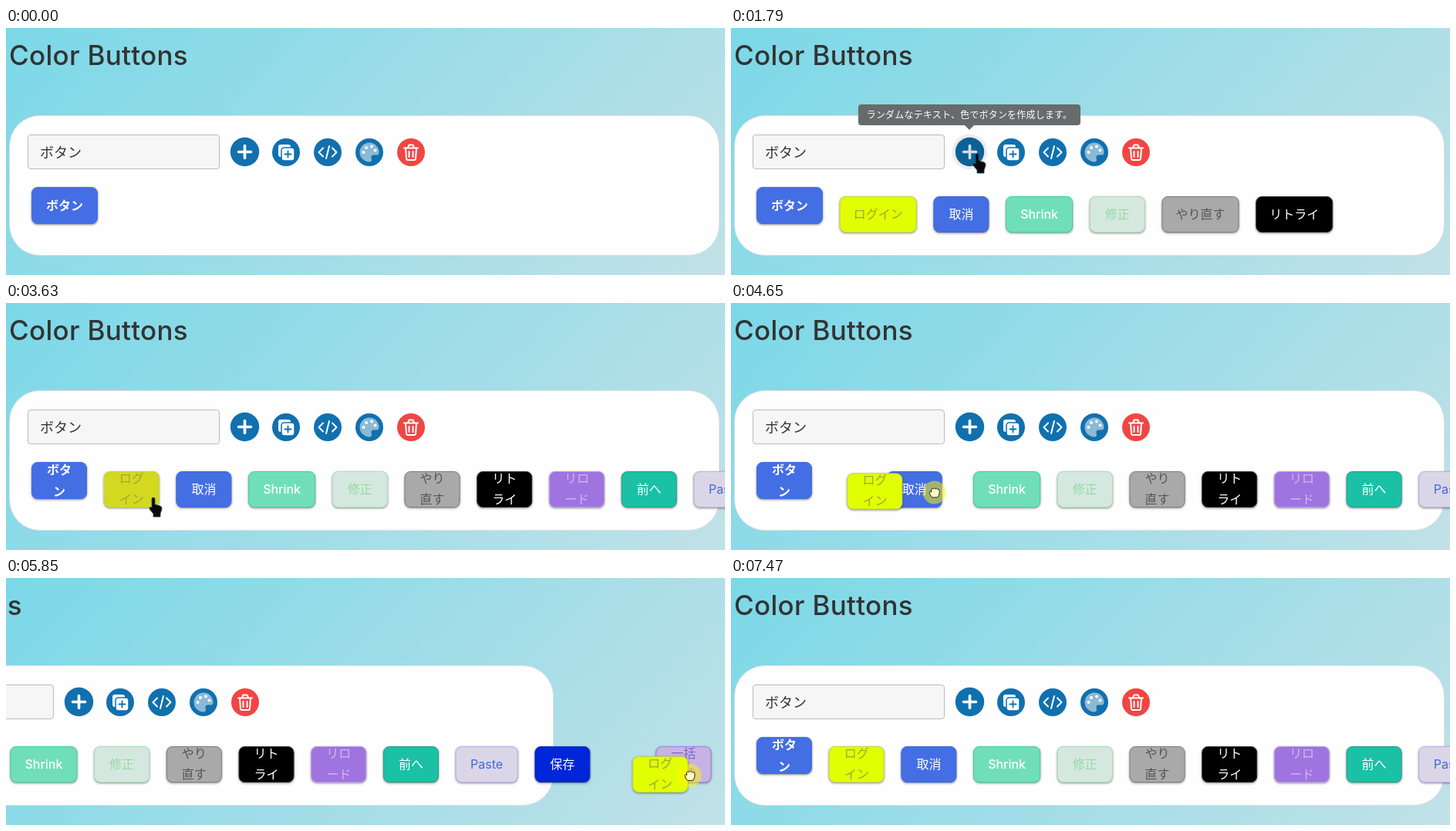
Write an HTML page that moves like this. It is 932x320 px and loops after 8.48 s.

```html
<!DOCTYPE html>
<html lang="ja">
<head>
<meta charset="utf-8">
<title>Color Buttons</title>
<style>
html, body { margin: 0; width: 100%; height: 100%; overflow: hidden; }
body {
  position: relative;
  background: linear-gradient(135deg, #7bd8e8, #c1e1e7);
  font-family: Inter, "Noto Sans CJK JP", "Noto Sans CJK", sans-serif;
}
#page, #page > *, .btn, #cursor { position: absolute; }
#page { left: 0; top: 0; width: 932px; height: 320px; }
h1 { left: 4px; top: 14px; margin: 0; font-size: 35px; line-height: 42px; font-weight: 500; letter-spacing: .3px; color: #333; white-space: nowrap; }
#card { left: 4px; top: 113px; width: 919px; height: 180px; border: 1px solid #d9dfe0; border-radius: 40px; background: #fefefe; }
#field { left: 28px; top: 138px; width: 232px; height: 43px; padding-left: 15px; border: 1px solid #bbb; border-radius: 4px; background: #f6f6f6; font-size: 18px; line-height: 45px; font-weight: 300; color: #333; }
#icons { left: 280px; top: 130px; }
#tip { left: 165px; top: 99px; width: 288px; height: 27px; border-radius: 4px; background: #676b6c; color: #fff; font-size: 12px; letter-spacing: .2px; line-height: 27px; text-align: center; white-space: nowrap; }
#tip::after { content: ""; position: absolute; left: 138px; top: 27px; border: 6px solid transparent; border-top-color: #676b6c; border-bottom: 0; }
#row { left: 0; top: 0; }
.btn {
  display: flex; flex-direction: column; justify-content: center; align-items: center;
  box-sizing: border-box; left: 0; top: 0; height: 47px; padding-bottom: 1px;
  border: 1px solid; border-radius: 8px; box-shadow: 0 1px 3px rgba(0, 0, 0, .45);
  font-size: 16px; line-height: 27px; white-space: nowrap;
}
.btn div { text-align: center; }
.two span { display: block; }
#cursor { left: 0; top: 0; overflow: visible; }
</style>
</head>
<body>
<div id="page">
  <h1>Color Buttons</h1>
  <div id="card"></div>
  <div id="field">ボタン</div>
  <svg id="icons" width="280" height="62" fill="none" stroke="#fff" stroke-width="2" stroke-linecap="round" stroke-linejoin="round">
    <circle id="halo" cx="29.500" cy="30.500" r="23" fill="#ededed" stroke="none"/>
    <g fill="#1170ae" stroke="none">
      <circle id="add" cx="29.500" cy="30.500" r="18.700"/>
      <circle cx="83" cy="31" r="18"/>
      <circle cx="137" cy="31" r="18"/>
      <circle cx="191" cy="31" r="18"/>
      <circle cx="245" cy="31" r="18" fill="#f04644"/>
    </g>
    <path id="plus" d="M21.500 30.500h16M29.500 22.500v16" stroke-width="3.600"/>
    <g transform="translate(83 31)">
      <rect x="-10" y="-10" width="16" height="16" rx="3" fill="#fff" stroke="none"/>
      <rect x="-6" y="-6" width="17" height="17" rx="3.500" fill="#fff" stroke="#1170ae" stroke-width="1.500"/>
      <path d="M-1.500 2.500h8M2.500-1.500v8" stroke="#1170ae" stroke-width="1.800"/>
    </g>
    <path transform="translate(137 31)" d="M-6-5.500L-11.500 0L-6 5.500M6-5.500L11.500 0L6 5.500M2-8L-2 8"/>
    <g transform="translate(191 31)" stroke="none">
      <path d="M0-12.500A12.500 12.500 0 1 0 0 12.500C4 12.500 3 9 2.500 7.500C2 4 4 3 7 3.500C11 4 12.500 3 12.500 0A12.500 12.500 0 0 0 0-12.500Z" fill="#8bbad6"/>
      <g fill="#fff"><circle cx="-7.500" r="2"/><circle cx="-4" cy="-6" r="2"/><circle cx="3" cy="-7.500" r="2"/><circle cx="7.500" cy="-2.500" r="2"/></g>
    </g>
    <path transform="translate(245 31)" d="M-9-5.500H9M-4-6L-2.500-9.500H2.500L4-6M-7-5L-6 8Q-6 10-4 10H4Q6 10 6 8L7-5M-2.500-1V6M2.500-1V6"/>
  </svg>
  <div id="row"></div>
  <div id="tip">ランダムなテキスト、色でボタンを作成します。</div>
</div>
<svg id="cursor" width="1" height="1" stroke-linejoin="round" stroke-linecap="round">
  <circle id="glow" r="15" fill="#fff700" fill-opacity=".5"/>
  <path id="point" d="M-2 1Q-2-1 0-1Q2-1 2 1V8L9 10Q11.500 11 11 14L9 20V24H0V20L-5 14Q-5 10-2 12Z" fill="#0a0a0a" stroke="#223c58" stroke-width=".8"/>
  <path id="grab" d="M-4-1V-4Q-3-6-1.500-4.500Q0-7 1.500-4.500Q3-6 4-4Q6-5 6.500-2.500V1Q6 4 4 6.500H-3Q-6 3-6.500 0Q-6-2-4-1Z" fill="#fffbc0" stroke="#222"/>
</svg>
<script>
const LOOP = 8480, GAP = 21.7, MIN = 72, LEFT = 33, RIGHT = 899;
const $ = id => document.getElementById(id);
const clamp = v => Math.max(0, Math.min(1, v));

// label, natural width, fill, text, border, weight, time of creation
const items = [
  ['ボタ|ン', 86, '#446ee3', '#fff', '#446ee3', 700, 0],
  ['ログ|イン', 100, '#e1ff00', '#a1a53f', '#c6d83a', 300, 790],
  ['取消', 72, '#446ee3', '#fff', '#3d66d8', 400, 990],
  ['Shrink', 87, '#70dfb9', '#fff', '#3fd09b', 500, 1190],
  ['修正', 72, '#d5e8df', '#98d9a8', '#aedfba', 400, 1390],
  ['やり|直す', 100, '#a9a9a9', '#555', '#7d7d7d', 300, 1590],
  ['リト|ライ', 100, '#000', '#fff', '#333', 400, 1790],
  ['リロ|ード', 100, '#9f74e0', '#d0b8ef', '#b69be4', 300, 1990],
  ['前へ', 72, '#1ac1a5', '#fff', '#2c9b85', 400, 2190],
  ['Paste', 81, '#dad6e8', '#4668d8', '#b9b0e6', 400, 2300],
  ['保存', 72, '#0026da', '#fff', '#1238b0', 500, 2500],
  ['一括|削除', 100, '#c7b3e3', '#7d66c6', '#9d86dc', 300, 2690]
].map(([label, width, fill, color, border, weight, born]) => {
  const el = document.createElement('div');
  el.className = 'btn';
  el.innerHTML = '<div>' + label.split('|').map(s => `<span>${s}</span>`).join('') + '</div>';
  Object.assign(el.style, { background: fill, color, borderColor: border, fontWeight: weight });
  $('row').append(el);
  return { el, width, fill, born, min: Math.min(width, width === 87 || width === 81 ? width : MIN) };
});
items[0].el.style.height = '48px';
items[0].el.style.lineHeight = '28px';
const login = items[1];

// screen steps: start, count, last
const steps = [
  [0, 1, 0], [100, 9, 890], [990, 9, 1790], [1890, 9, 2710], [2810, 9, 3630], [3730, 5, 4130],
  [4330, 1, 4330], [4530, 9, 5350], [5450, 9, 6250], [6370, 9, 7170], [7270, 3, 7470]
];
function stepTime(t) {
  const [start, n, last] = steps.filter(s => s[0] <= t).pop();
  const gap = n > 1 ? (last - start) / (n - 1) : 1;
  return start + Math.min(n - 1, Math.floor((t - start) / gap + .001)) * gap;
}

const path = [
  [100, 306, 236], [500, 319, 164], [2810, 319, 164], [3600, 191, 253], [3730, 191, 253],
  [4130, 202, 243], [4560, 202, 243], [5250, 789, 266], [5370, 895, 264], [6200, 880, 250],
  [6380, 311, 243], [6430, 218, 242], [6520, 128, 242], [6570, 127, 242], [6750, 90, 242],
  [6900, 110, 243], [7130, 202, 243]
];
const scrollKeys = [[5300, 0], [5800, 215], [6570, 215], [6900, 0]];

function track(keys, t, col = 1) {
  const i = keys.findIndex(k => k[0] > t);
  if (i < 0) return keys[keys.length - 1][col];
  if (!i) return keys[0][col];
  const a = keys[i - 1], b = keys[i];
  return a[col] + (b[col] - a[col]) * (t - a[0]) / (b[0] - a[0]);
}
const scrollAt = t => track(scrollKeys, t);
const pageX = t => track(path, t) + scrollAt(t);

// share of the last 200 ms that the dragged button spent beyond x
function passed(x, t) {
  let n = 0;
  for (let d = 0; d < 200; d += 5) {
    const u = t - d;
    if (u > 4530 && u < 7170 && pageX(u) > x + 10) n++;
  }
  return n / 40;
}

function layout(t) {
  const shown = items.filter(b => b.born <= t);
  const sum = f => shown.reduce((s, b) => s + f(b), 0);
  const end = LEFT + sum(b => b.width + GAP) - GAP;
  const slack = sum(b => b.width - b.min);
  const squeeze = slack ? clamp((end - RIGHT) / slack) : 0;
  const dragging = t >= 4530 && t <= 7170;
  let x = LEFT;
  items.forEach((b, i) => {
    const w = b.width - (b.width - b.min) * squeeze;
    let left = x, top = i ? 218 : 206;
    if (b === login && dragging) {
      left = pageX(t - 45) - 75;
      top = track(path, t, 2) - 25;
    } else if (i > 1 && t > 4530) {
      left -= (MIN + GAP) * passed(x, t);
    }
    b.el.style.display = b.born <= t ? '' : 'none';
    b.el.style.width = w + 'px';
    b.el.style.transform = `translate(${left}px, ${top}px)`;
    b.el.classList.toggle('two', w < b.width - 10);
    x += w + GAP;
  });
  login.el.style.zIndex = dragging ? 2 : 0;
  login.el.style.background = t > 3480 && t < 3900 ? '#d3d91f' : login.fill;
}

function render(t) {
  layout(t);
  $('page').style.transform = `translateX(${-scrollAt(t)}px)`;

  const hover = t > 380 && t < 2950;
  $('halo').style.display = hover ? '' : 'none';
  $('tip').style.display = t > 480 && t < 3000 ? '' : 'none';
  $('add').style.fill = hover ? '#0c6297' : '';
  $('plus').style.stroke = hover ? '#d5dde4' : '';

  const grabbing = t >= 3930;
  const click = items.some(b => b.born && t >= b.born - 100 && t < b.born);
  const held = t >= 4330 && t <= 7170;
  $('cursor').style.display = t >= 100 && t < 7270 ? '' : 'none';
  $('cursor').style.transform = `translate(${track(path, t)}px, ${track(path, t, 2)}px)`;
  $('glow').style.display = click || held ? '' : 'none';
  $('point').style.display = grabbing ? 'none' : '';
  $('grab').style.display = grabbing ? '' : 'none';
}

const began = performance.now();
function tick() {
  render(stepTime((performance.now() - began) % LOOP));
  requestAnimationFrame(tick);
}
tick();
</script>
</body>
</html>
```
